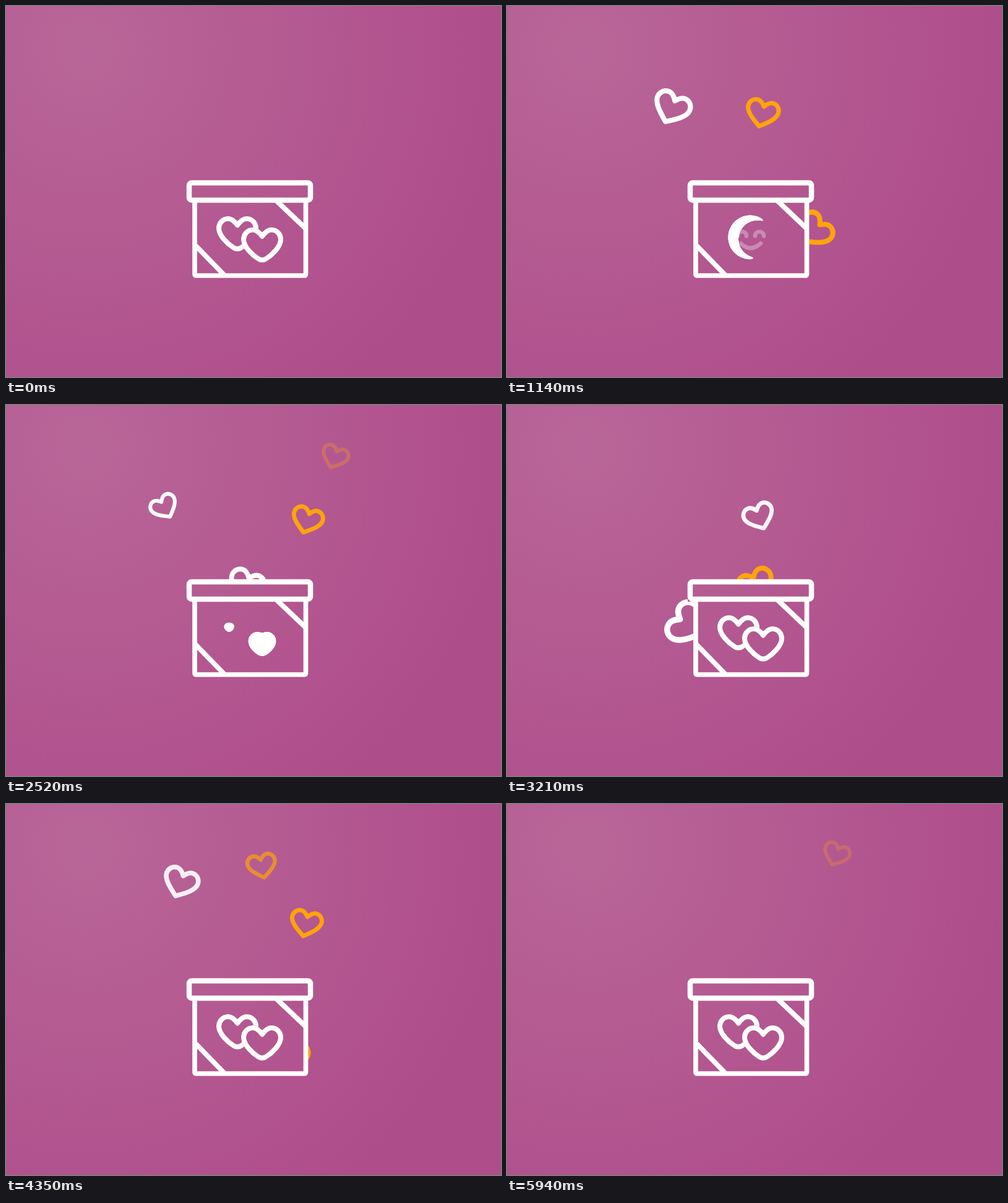
Animation, 800 px wide and 600 px high, one loop 5970 ms. Source, as an HTML page:

```html
<!DOCTYPE html>
<html lang="en">
<head>
<meta charset="utf-8">
<title>Gift box with hearts</title>
<style>
  html, body { margin: 0; height: 100%; overflow: hidden; background: #b2548f; }
  svg { display: block; width: 100vw; height: 100vh; }
  .line { fill: none; stroke: #fff; stroke-linejoin: round; stroke-linecap: round; }
</style>
</head>
<body>
<svg viewBox="0 0 800 600">
  <defs>
    <radialGradient id="bg" gradientUnits="userSpaceOnUse" cx="128" cy="68" r="700">
      <stop offset="0" stop-color="#b86699"/>
      <stop offset=".36" stop-color="#b55d93"/>
      <stop offset=".7" stop-color="#b2548f"/>
      <stop offset="1" stop-color="#ad4d8a"/>
    </radialGradient>
    <path id="heart" stroke-linejoin="round" d="M0-14C-5-21-9-24.5-15-24.5C-24-24.5-30-17-30-9
      C-30 3-16 16-6 22.5Q0 26 6 22.5C16 16 30 3 30-9C30-17 24-24.5 15-24.5C9-24.5 5-21 0-14Z"/>
    <path id="balloon" stroke-linejoin="round" d="M0-14C-5-21-9-24.5-15-24.5C-24-24.5-30-17-30-9
      C-30 4-12 16 0 25C12 16 30 4 30-9C30-17 24-24.5 15-24.5C9-24.5 5-21 0-14Z"/>
    <mask id="behind" maskUnits="userSpaceOnUse" x="300" y="300" width="200" height="150">
      <rect x="300" y="300" width="200" height="150" fill="#fff"/>
      <use href="#heart" x="414" y="386.5" fill="#000" stroke="#000" stroke-width="8"/>
    </mask>
    <mask id="ring" maskUnits="userSpaceOnUse" x="300" y="300" width="200" height="150">
      <rect x="300" y="300" width="200" height="150" fill="#fff"/>
      <circle id="hole"/>
    </mask>
    <clipPath id="outside">
      <path clip-rule="evenodd" d="M0 0H800V600H0ZM292 282H496V318H292ZM301 318H488V440H301Z"/>
    </clipPath>
    <filter id="goo" filterUnits="userSpaceOnUse" x="310" y="310" width="170" height="130"
      color-interpolation-filters="sRGB">
      <feGaussianBlur stdDeviation="2.2"/>
      <feColorMatrix values="0 0 0 0 1  0 0 0 0 1  0 0 0 0 1  0 0 0 10 -4.3"/>
    </filter>
  </defs>

  <rect width="800" height="600" fill="url(#bg)"/>
  <g id="floating" clip-path="url(#outside)"></g>

  <g class="line" stroke-width="8.5">
    <rect x="296" y="286" width="196" height="28" rx="4"/>
    <rect x="305" y="314" width="179.5" height="122" rx="2" stroke-width="7.7"/>
    <path stroke-linecap="butt" stroke-width="8" d="M436 314L484 359.5M305 386L353.5 436"/>
  </g>

  <g id="emblem">
    <g class="line">
      <g mask="url(#behind)"><use id="backHeart" href="#heart"/></g>
      <use id="frontHeart" href="#heart"/>
    </g>
    <g mask="url(#ring)"><circle id="disc" cx="393" cy="374" fill="#fff"/></g>
  </g>
  <g id="features" class="line" stroke-width="6.5">
    <path id="wink"/>
    <path d="M401 372C401 362.7 415 362.7 415 372M378 384Q393 399 410 384"/>
  </g>
</svg>
<script>
const LOOP = 5970, CENTER = 393, FLOOR = 404;
const WHITE = '#fff', ORANGE = '#ffa30c';
const $ = id => document.getElementById(id);
const clamp = v => Math.max(0, Math.min(1, v));
const ramp = (t, a, b) => clamp((t - a) / (b - a));
const smooth = (t, a, b) => { const u = ramp(t, a, b); return u * u * (3 - 2 * u); };
const set = (el, attrs) => { for (const k in attrs) el.setAttribute(k, attrs[k]); };

// Every heart sways on a cosine: `reach` is its mean distance from the center line,
// `peak` the height of its outermost point, `half` the half wavelength,
// `exit` the height below which it bends in behind the box, `top` where it vanishes.
const left = { side: -1, reach: 127, sway: 29, half: 200, peak: 265, exit: 300, top: 60, rate: 1, size: 75 };
const right = { side: 1, reach: 137, sway: 14, half: 112, peak: 255, exit: 320, top: 62, rate: 1, size: 64 };
const upperLeft = { side: -1, reach: 137, sway: 28, half: 150, peak: 90, exit: 230, top: 75, rate: 1, size: 57 };
const upperRight = { side: 1, reach: 122, sway: 32, half: 150, peak: 60, exit: 220, top: 80, rate: 1, size: 63 };
const middle = { side: 1, reach: 5, sway: 17, half: 110, peak: 155, exit: FLOOR, top: 48, rate: 0.8, size: 65 };

const hearts = [
  { ...left, born: -125, color: WHITE },
  { ...middle, born: -391, color: ORANGE },
  { ...right, born: 895, color: ORANGE },
  { ...upperLeft, born: 1255, color: WHITE },
  { ...upperRight, born: 1355, color: ORANGE },
  { ...middle, born: 1719, color: WHITE, peak: 215, top: 110 },
  { ...left, born: 2915, color: WHITE },
  { ...middle, born: 2406, color: ORANGE, peak: 115 },
  { ...upperRight, born: 3218, color: ORANGE },
  { ...right, born: 4305, color: ORANGE },
];
for (const h of hearts) {
  h.el = document.createElementNS('http://www.w3.org/2000/svg', 'use');
  set(h.el, { href: '#balloon', fill: 'none', stroke: h.color, 'stroke-width': 8.6 });
  $('floating').append(h.el);
}

function xAt(h, y) {
  const bend = Math.max(0, y - h.exit) ** 2 / 95;
  return CENTER + h.side * (h.reach + h.sway * Math.cos(Math.PI * (y - h.peak) / h.half) - bend);
}

function drawHeart(h, time) {
  const t = (time - h.born) * h.rate;
  const y = FLOOR - 0.16 * t - 2.25e-5 * t * t;
  const visible = t > 0 && y > h.top;
  h.el.style.display = visible ? '' : 'none';
  if (!visible) return;
  const angle = Math.atan(xAt(h, y - 0.5) - xAt(h, y + 0.5)) * 180 / Math.PI;
  const u = (FLOOR - y) / (FLOOR - h.top);
  const scale = h.size * (1 - 0.3 * u * u) / 68;
  set(h.el, {
    transform: `translate(${xAt(h, y)} ${y}) rotate(${angle}) scale(${scale})`,
    opacity: clamp((y - h.top) / 75),
  });
}

// A heart swells from a solid drop at (ox, oy) to an outline at (x, y).
function swell(el, g, x, y, ox, oy) {
  set(el, {
    transform: `translate(${ox + (x - ox) * g} ${oy + (y - oy) * g}) scale(${g})`,
    'stroke-width': 8 + 44 * (1 - g),
    visibility: g > 0 ? 'visible' : 'hidden',
  });
}

const openEye = [373, 372, 373, 362.7, 387, 362.7, 387, 372];
const shutEye = [373, 366, 379, 364.5, 381, 368.5, 387.5, 369.5];

function drawEmblem(t) {
  const front = 1 - smooth(t, 800, 1090) + smooth(t, 2250, 2790);
  const back = 1 - smooth(t, 760, 1050) + smooth(t, 2380, 2930);
  swell($('frontHeart'), front, 414, 386.5, 414, 386.5);
  swell($('backHeart'), back, 374, 368.5, 358, 358);

  // The face is a disc whose hole slides in from the right.
  const f = smooth(t, 950, 1260) - smooth(t, 2200, 2500);
  const grow = Math.sin(f * Math.PI / 2);
  set($('disc'), { r: 41.2 * grow });
  set($('hole'), { cx: 393 + 34 * (1 - f), cy: 374 + 9 * (1 - f), r: 34.7 * grow });

  const morphing = (t > 760 && t < 1260) || (t > 2200 && t < 2930);
  set($('emblem'), { filter: morphing ? 'url(#goo)' : 'none' });

  set($('features'), { opacity: ramp(t, 1080, 1280) - ramp(t, 2200, 2400) });
  const w = smooth(t, 1520, 1680) - smooth(t, 1900, 2060);
  const [x, y, ...c] = openEye.map((v, i) => v + (shutEye[i] - v) * w);
  set($('wink'), { d: `M${x} ${y}C${c.join(' ')}` });
}

const origin = performance.now();
function frame() {
  const t = (performance.now() - origin) % LOOP;
  hearts.forEach(h => drawHeart(h, t));
  drawEmblem(t);
  requestAnimationFrame(frame);
}
frame();
</script>
</body>
</html>
```
